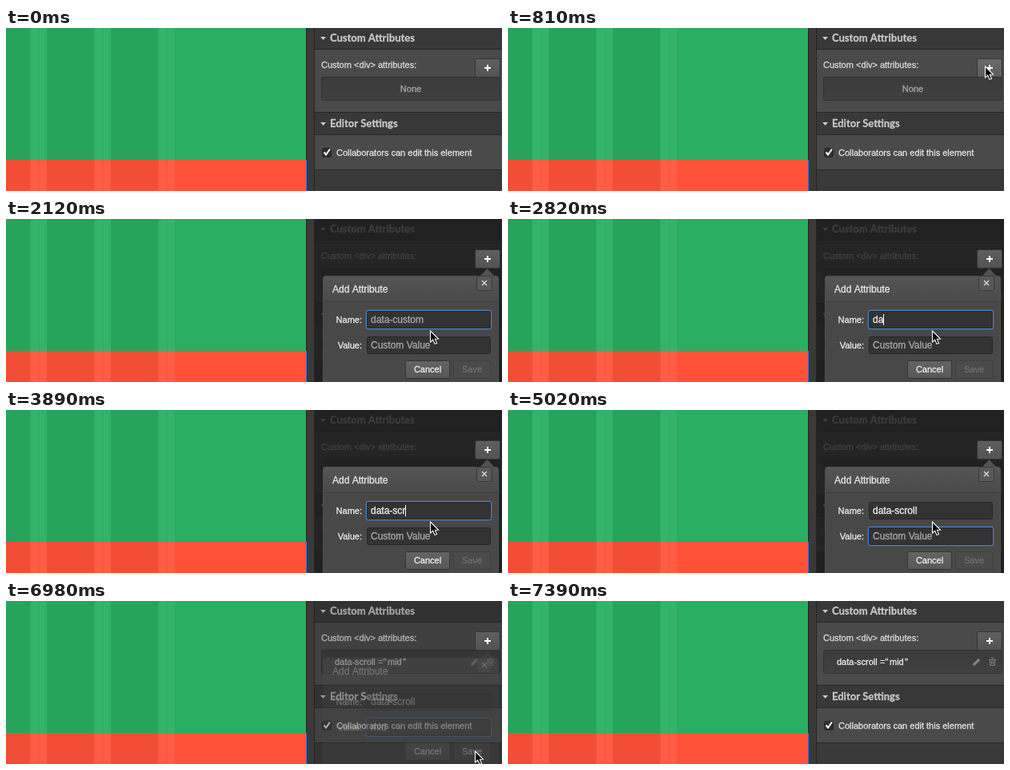
An HTML page with a canvas for the animation above (8710 ms loop, 620x204 px).

```html
<!DOCTYPE html>
<html>
<head>
<meta charset="utf-8">
<style>
html, body { margin: 0; width: 620px; height: 204px; overflow: hidden; background: #2a2a2a; }
canvas { display: block; }
</style>
</head>
<body>
<canvas id="stage" width="620" height="204"></canvas>
<script>
const ctx = document.getElementById('stage').getContext('2d');
const LOOP = 8710;
const SANS = '"Liberation Sans", Arial, sans-serif';

// [time, x, y] stops of the pointer
const PATH = [[350, 590, 190], [800, 597, 48], [1400, 597, 48], [2120, 531, 140],
  [6220, 531, 140], [6510, 585, 146], [6680, 587, 188], [7390, 587, 188]];
const NAME_KEYS = [2600, 2820, 3000, 3180, 3420, 3600, 3710, 3890, 4000, 4180, 4300];
const VALUE_KEYS = [5200, 5440, 5560];
const FOCUS_VALUE = 4480;

const clamp = v => Math.max(0, Math.min(1, v));
const ramp = (t, from, to) => clamp((t - from) / (to - from));
const within = (t, from, to) => t >= from && t < to;
const typed = (text, keys, t) => text.slice(0, keys.filter(k => t >= k).length);

function rect(x, y, w, h, fill) {
  ctx.fillStyle = fill;
  ctx.fillRect(x, y, w, h);
}

function outline(x, y, w, h, radius, color) {
  ctx.beginPath();
  ctx.roundRect(x + .5, y + .5, w - 1, h - 1, radius);
  ctx.strokeStyle = color;
  ctx.lineWidth = 1;
  ctx.stroke();
}

function box(x, y, w, h, fill, border, radius = 2) {
  ctx.beginPath();
  ctx.roundRect(x + .5, y + .5, w - 1, h - 1, radius);
  ctx.fillStyle = fill;
  ctx.fill();
  outline(x, y, w, h, radius, border);
}

function shade(y, h, top, bottom) {
  const g = ctx.createLinearGradient(0, y, 0, y + h);
  g.addColorStop(0, top);
  g.addColorStop(1, bottom);
  return g;
}

// A hairline stroke gives the slightly heavy smoothed type
function text(str, x, y, color, size = 11, align = 'left', font = SANS, weight = 400) {
  ctx.font = `${weight} ${size}px ${font}`;
  ctx.textAlign = align;
  ctx.fillStyle = ctx.strokeStyle = color;
  ctx.lineWidth = .3;
  ctx.lineJoin = 'round';
  ctx.fillText(str, x, y);
  ctx.strokeText(str, x, y);
  ctx.lineJoin = 'miter';
}

function poly(points, fill) {
  ctx.beginPath();
  points.forEach(([x, y]) => ctx.lineTo(x, y));
  ctx.closePath();
  ctx.fillStyle = fill;
  ctx.fill();
}

function lines(color, width, ...strokes) {
  ctx.beginPath();
  for (const [start, ...rest] of strokes) {
    ctx.moveTo(...start);
    rest.forEach(p => ctx.lineTo(...p));
  }
  ctx.strokeStyle = color;
  ctx.lineWidth = width;
  ctx.stroke();
}

function drawPage() {
  const bands = [[0, 165, '#29ae62', '#26a45b', '#34b36b', '#2dab63'],
                 [165, 39, '#ff5238', '#f24d35', '#ff5d45', '#f5573f']];
  for (const [y, h, base, column, gutter, edge] of bands) {
    rect(0, y, 375, h, base);
    rect(0, y, 191, h, column);
    for (const x of [31, 111, 191]) {
      rect(x, y, 20, h, gutter);
      for (const dx of [-1, 10]) rect(x + dx, y, 1, h, edge);
    }
  }
  rect(375, 0, 1, 165, '#222');
  rect(375, 165, 1, 39, '#3a6cc8');
  rect(376, 0, 9, 204, '#393939');
  rect(385, 0, 1, 204, '#242424');
}

function heading(label, y, h, baseline) {
  rect(386, y, 234, h, '#383838');
  rect(386, y + h - 1, 234, 1, '#272727');
  poly([[393, baseline - 6], [400, baseline - 6], [396.5, baseline - 2]], '#ccc');
  text(label, 405, baseline, '#c8c8c8', 13, 'left', 'Lato, sans-serif', 700);
}

function drawRow(saved) {
  box(394, 61, 224, 30, shade(61, 30, '#3b3b3b', '#404040'), '#313131');
  if (!saved) return text('None', 506, 80, '#a8a8a8', 11, 'center');
  text('data-scroll', 411, 80, '#eee');
  text('="', 465, 80, '#eee');
  text('mid', 477, 80, '#eee');
  text('"', 496, 80, '#eee');
  lines('#858585', 3, [[583, 79], [589, 73]]);
  poly([[581, 81], [582, 77], [585, 80]], '#858585');
  lines('#858585', 1, [[601, 73.5], [610, 73.5]], [[604, 71.5], [607, 71.5]],
    [[602.5, 74], [602.5, 80.5], [608.5, 80.5], [608.5, 74]],
    [[604.5, 75], [604.5, 79]], [[606.5, 75], [606.5, 79]]);
}

function drawPanel(saved) {
  rect(386, 0, 234, 204, '#4a4a4a');
  heading('Custom Attributes', 0, 27, 17);
  text('Custom <div> attributes:', 394, 50, '#dadada');
  drawRow(saved);
  rect(386, 105, 234, 1, '#272727');
  heading('Editor Settings', 106, 28, 124);
  box(395, 150, 12, 12, '#2e2e2e', '#262626');
  lines('#fff', 2, [[397.5, 155.5], [400, 158.5], [405, 151.5]]);
  text('Collaborators can edit this element', 413, 160, '#e4e4e4');
  rect(386, 177, 234, 27, '#393939');
  rect(386, 177, 234, 1, '#272727');
}

function drawPlus(hover) {
  box(586, 38, 32, 24, hover ? shade(38, 24, '#6a6a6a', '#5c5c5c') : shade(38, 24, '#5f5f5f', '#535353'), '#333');
  rect(598, 49, 8, 2, '#fff');
  rect(601, 46, 2, 8, '#fff');
}

function drawField(label, y, value, placeholder, focused, caret) {
  text(label, 445, y + 15, '#eee', 11, 'right');
  box(451, y, 155, 22, '#333', '#272727');
  if (focused) {
    outline(450, y - 1, 157, 24, 2, '#4a86d0');
    outline(449, y - 2, 159, 26, 3, 'rgba(60, 115, 195, .25)');
  }
  text(value || placeholder, 456, y + 15, value ? '#f2f2f2' : '#a9a9a9', 12);
  if (caret) rect(456 + Math.round(value ? ctx.measureText(value).width : 0), y + 4, 1, 14, '#fff');
}

function drawButton(label, x, w, enabled, pressed) {
  const fill = !enabled ? '#4a4a4a' : pressed ? '#4d4d4d' : shade(177, 23, '#646464', '#585858');
  box(x, 177, w, 23, fill, enabled ? '#343434' : '#404040');
  text(label, x + w / 2, 192, enabled ? '#f0f0f0' : '#707070', 11, 'center');
}

function drawDialog(t) {
  poly([[601.5, 62], [610, 71], [593, 71]], '#525252');
  box(396, 71, 220, 150, '#484848', '#515151', 3);
  rect(397, 72, 218, 31, shade(72, 31, '#555', '#4a4a4a'));
  rect(397, 103, 218, 1, '#3c3c3c');
  text('Add Attribute', 408, 92, '#ececec', 12);
  box(588, 71, 20, 19, '#595959', '#393939');
  lines('#ddd', 1.4, [[595, 77], [601, 83]], [[601, 77], [595, 83]]);

  const name = typed('data-scroll', NAME_KEYS, t);
  const value = typed('mid', VALUE_KEYS, t);
  const onValue = t >= FOCUS_VALUE;
  drawField('Name:', 115, name, 'data-custom', !onValue, t < 1500 || within(t, 2600, FOCUS_VALUE));
  drawField('Value:', 147, value, 'Custom Value', onValue, within(t, FOCUS_VALUE, 5020) || within(t, 5200, 6040));
  drawButton('Cancel', 499, 56, true);
  drawButton('Save', 559, 47, value !== '', t >= 6740);
}

function pointerAt(t) {
  const i = Math.max(1, PATH.findIndex(stop => stop[0] > t));
  const [t0, x0, y0] = PATH[i - 1], [t1, x1, y1] = PATH[i];
  const p = ramp(t, t0, t1), e = p * p * (3 - 2 * p);
  return [x0 + (x1 - x0) * e, y0 + (y1 - y0) * e];
}

function drawPointer(x, y) {
  const shape = [[0, 0], [0, 14], [3.2, 11.2], [5.5, 16.4], [8, 15.4], [5.8, 10.2], [10, 10]];
  ctx.save();
  ctx.translate(x - .5, y);
  poly(shape, '#000');
  ctx.strokeStyle = '#fff';
  ctx.lineWidth = 1.1;
  ctx.stroke();
  ctx.restore();
}

function draw(t) {
  const open = ramp(t, 880, 1080) * (1 - ramp(t, 6800, 7040));
  const visible = within(t, 350, 7390);
  const [x, y] = visible ? pointerAt(t) : [0, 0];

  drawPage();
  drawPanel(t >= 6740);
  ctx.globalAlpha = open * .82;
  rect(386, 0, 234, 204, '#1d1d1d');
  ctx.globalAlpha = 1;
  drawPlus(x > 586 && y > 38 && y < 62);
  if (open) {
    ctx.globalAlpha = open;
    drawDialog(t);
  }
  if (visible) {
    ctx.globalAlpha = t < 7330 ? 1 : .5;
    drawPointer(x, y);
  }
  ctx.globalAlpha = 1;
}

const start = performance.now();
function tick() {
  draw((performance.now() - start) % LOOP);
  requestAnimationFrame(tick);
}
tick();
</script>
</body>
</html>
```
